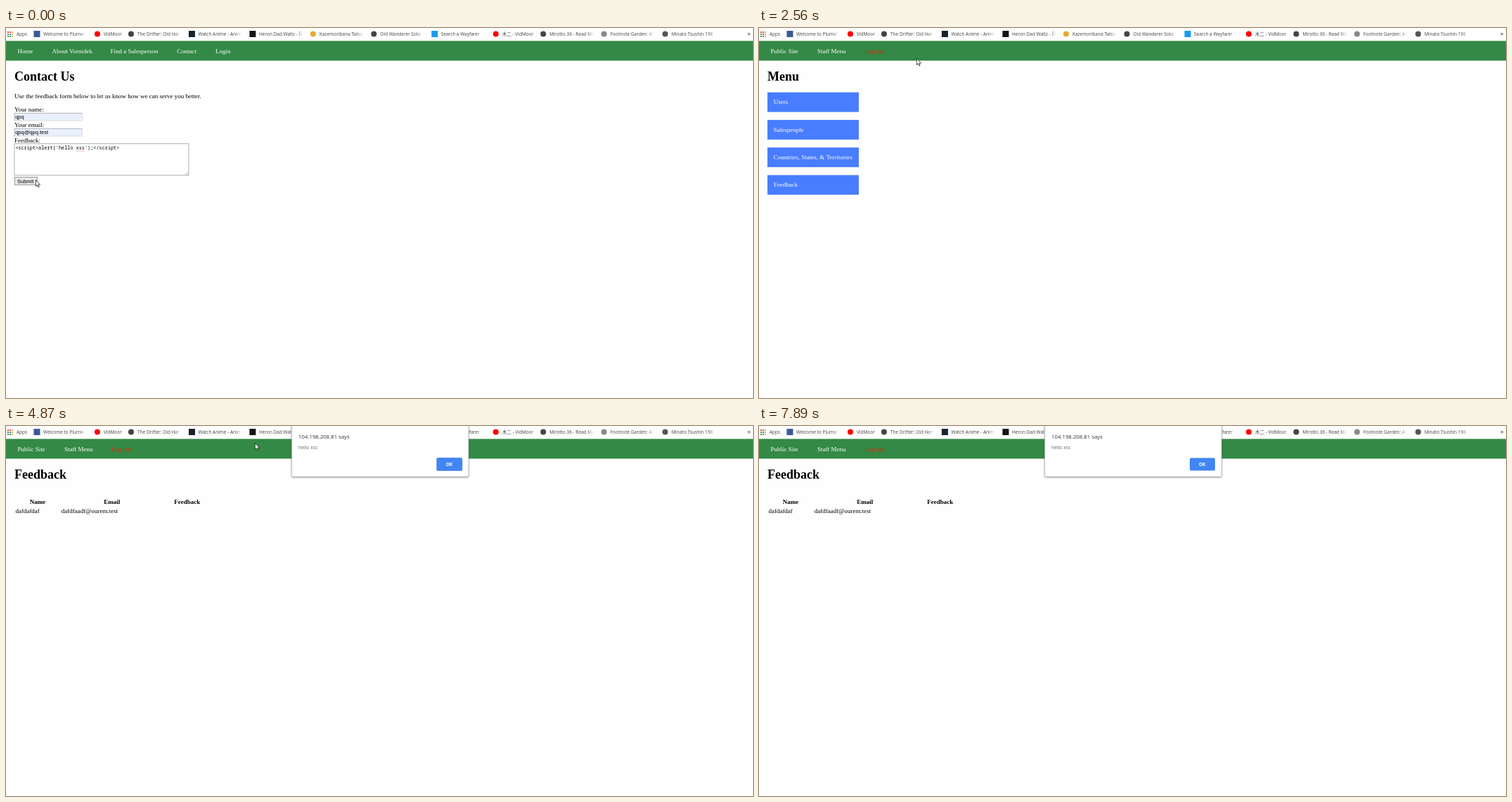
Recreate the animation shown at these times as an HTML page. Size 1063 px wide and 527 px high, loop 7.99 s.

```html
<!DOCTYPE html>
<html lang="en">
<head>
<meta charset="utf-8">
<title>Feedback form</title>
<style>
  html, body { margin: 0; width: 100%; height: 100%; overflow: hidden; background: #fefefe; }
  svg { display: block; }
  text { white-space: pre; }
  .serif { font: 9px "Liberation Serif", "Times New Roman", serif; }
  .bold { font-weight: bold; }
  .title { font: bold 18px "Liberation Serif", "Times New Roman", serif; }
  .ui { font: 6.5px "Open Sans", "Noto Sans CJK SC", "Noto Sans CJK JP", sans-serif; }
  .field { font: 7.5px "Liberation Sans", Arial, sans-serif; }
  .code { font: 6.86px "Noto Sans Mono", "DejaVu Sans Mono", monospace; }
</style>
</head>
<body>
<svg id="stage" width="1063" height="527" viewBox="0 0 1063 527">
  <defs>
    <linearGradient id="fade">
      <stop offset="0" stop-color="#fefefe" stop-opacity="0"/>
      <stop offset="1" stop-color="#fefefe"/>
    </linearGradient>
    <filter id="shadow" x="-5%" y="-10%" width="110%" height="125%">
      <feDropShadow dx="0" dy="1" stdDeviation="1" flood-opacity=".45"/>
    </filter>
  </defs>
  <rect width="1063" height="527" fill="#fefefe"/>
  <g id="bookmarks"></g>
  <rect y="18.4" width="1063" height="28.1" fill="#338945"/>
  <g id="publicNav"></g>
  <g id="staffNav"></g>
  <g id="contact"></g>
  <g id="received"></g>
  <g id="menu"></g>
  <g id="feedback"></g>
  <g id="dialog"></g>
  <path id="arrow" d="M.4 .4V9.5L2.4 7.6L3.8 10.8L5.2 10.2L3.8 7.1H6.6Z" fill="#fff" stroke="#111" stroke-width=".75"/>
  <path id="hand" d="M2.7 1.4Q3.6 .2 4.5 1.4V5.2L7.4 5.8Q8.8 6.2 8.6 7.8L7.8 12.4H3.2L.5 8.4Q.4 7 1.5 7.3L2.7 8.6Z" fill="#fff" stroke="#111" stroke-width=".8"/>
</svg>
<script>
const NS = "http://www.w3.org/2000/svg";
const LOOP = 7990;
const el = id => document.getElementById(id);

function add(parent, tag, attrs, content) {
  const node = document.createElementNS(NS, tag);
  for (const key in attrs) node.setAttribute(key, attrs[key]);
  if (content) node.textContent = content;
  parent.appendChild(node);
  return node;
}
const text = (parent, cls, x, y, content, fill = "#000", anchor = "start") =>
  add(parent, "text", { class: cls, x, y, fill, "text-anchor": anchor }, content);
const rect = (parent, x, y, width, height, fill, more) =>
  add(parent, "rect", { x, y, width, height, fill, ...more });

// Bookmark: label, label x, right edge, icon colour, icon shape
const bookmarks = [
  ["Welcome to Plumvi", 53, 115, "#3b5998", "square"],
  ["VidMoor", 139, 167, "#f00", "circle"],
  ["The Drifter: Old Har", 187, 250, "#444", "circle"],
  ["Watch Anime - Anim", 273.5, 336, "#182430", "square"],
  ["Heron Dad Waltz - 阡", 360, 423, "#151515", "square"],
  ["Kazemoribana Tatsuo -", 446, 509, "#e8ac32", "circle"],
  ["Old Wanderer Sota", 532.5, 594, "#444", "circle"],
  ["Search a Wayfarer", 619, 680, "#1a9af0", "square"],
  ["木二 - VidMoor", 706, 753, "#f00", "circle"],
  ["Mirotto 36 - Read Ma", 773.5, 837, "#444", "circle"],
  ["Footnote Garden: AP", 860, 922, "#888", "circle"],
  ["Minato Tsushin 198", 947, 1010, "#555", "circle"]
];

function drawBookmarks() {
  const bar = el("bookmarks");
  const dots = ["#e24b3b", "#e24b3b", "#e9a53a", "#3d9b57", "#4279d8", "#e9a53a", "#3d9b57", "#3d9b57", "#e9b33a"];
  dots.forEach((fill, i) => rect(bar, 2 + i % 3 * 3, 5 + Math.floor(i / 3) * 3, 2, 2, fill));
  text(bar, "ui", 15, 10.7, "Apps", "#444");
  for (const [label, x, end, fill, shape] of bookmarks) {
    if (shape === "circle") add(bar, "circle", { cx: x - 9, cy: 8.4, r: 4, fill });
    else rect(bar, x - 13.5, 4, 9, 9, fill);
    const box = add(bar, "svg", { x, y: 0, width: end - x, height: 18, overflow: "hidden" });
    text(box, "ui", 0, 10.7, label, "#444");
    if (end - x > 55) rect(box, end - x - 10, 0, 10, 18, "url(#fade)");
  }
  text(bar, "ui", 1055, 10.8, "»", "#333").style.fontSize = "9px";
}

function drawNav() {
  const publicNav = el("publicNav"), staffNav = el("staffNav");
  [[16.5, "Home"], [65.5, "About Vornidek"], [148.5, "Find a Salesperson"], [243.3, "Contact"], [298, "Login"]]
    .forEach(([x, label]) => text(publicNav, "serif", x, 36, label, "#fff"));
  text(staffNav, "serif", 16.5, 36, "Public Site", "#fff");
  text(staffNav, "serif", 83, 36, "Staff Menu", "#fff");
  text(staffNav, "serif", 150, 36, "Log out", "#f51d0c");
}

function drawContact() {
  const page = el("contact");
  text(page, "title", 12, 75, "Contact Us");
  text(page, "serif", 12, 99.6, "Use the feedback form below to let us know how we can serve you better.");
  [["Your name:", "qpq", 118.6], ["Your email:", "qpq@qpq.test", 140.6]].forEach(([label, value, y]) => {
    text(page, "serif", 12, y, label);
    rect(page, 12, y + 2.5, 96.5, 11, "#e8f0fe");
    add(page, "path", { d: `M12 ${y + 13.4}V${y + 2.7}H108.4`, fill: "none", stroke: "#888", "stroke-width": .6 });
    add(page, "path", { d: `M12 ${y + 13.4}H108.4V${y + 2.7}`, fill: "none", stroke: "#ccc", "stroke-width": .6 });
    text(page, "field", 13.2, y + 10.5, value);
  });
  text(page, "serif", 12, 162.6, "Feedback:");
  rect(page, 12, 164.8, 248, 45, "#fff", { stroke: "#999", "stroke-width": .8 });
  text(page, "code", 13.2, 173, "<script>alert('hello xss');<\/script>");
  add(page, "path", { d: "M99.5 175.6" + "l1 -1l1 1".repeat(6), fill: "none", stroke: "#e55", "stroke-width": .5 });
  add(page, "path", { d: "M254.5 209l4.5 -4.5M257 209l2 -2", stroke: "#888", "stroke-width": .5 });
  rect(page, 12.2, 212.4, 32.4, 11, "#e7e7e7", { stroke: "#888", "stroke-width": .8 });
  text(page, "field", 16, 220.6, "Submit");
}

function drawReceived() {
  const page = el("received");
  text(page, "title", 12, 75, "Feedback Received");
  text(page, "serif", 12, 99.6, "Thank you for submitting feedback. We hope to be able to use it to serve you");
  text(page, "serif", 12, 109.6, "better.");
}

let feedbackButton;
function drawMenu() {
  const page = el("menu");
  text(page, "title", 12, 75, "Menu");
  ["Users", "Salespeople", "Countries, States, & Territories", "Feedback"].forEach((label, i) => {
    const y = 91.6 + i * 39.3;
    feedbackButton = rect(page, 12, y, 130, 28, "#497dff");
    text(page, "serif", 20.8, y + 16.7, label, "#fff");
  });
}

function drawFeedback() {
  const page = el("feedback");
  text(page, "title", 12, 75, "Feedback");
  [[45, "Name"], [150.7, "Email"], [257.8, "Feedback"]]
    .forEach(([x, label]) => text(page, "serif bold", x, 111, label, "#000", "middle"));
  text(page, "serif", 13.4, 123.6, "dafdafdaf");
  text(page, "serif", 78.7, 123.6, "dafdfaadf@ourem.test");
}

let okButton;
function drawDialog() {
  const box = el("dialog");
  rect(box, 406.7, -4, 251.5, 76, "#fff", { rx: 1, stroke: "#aaa", "stroke-width": .6, filter: "url(#shadow)" });
  text(box, "ui", 416, 17.8, "104.198.208.81 says", "#333").style.fontSize = "7.8px";
  text(box, "ui", 416, 33.4, "hello xss", "#666").style.fontSize = "6.75px";
  okButton = rect(box, 613, 45.5, 36, 18, "#4285f4", { rx: 1.5, "stroke-width": .7 });
  text(box, "ui bold", 630.7, 56.8, "OK", "#fff", "middle").style.fontWeight = 700;
}

// Pointer stops: time, x, y, shape
const stops = [
  [0, 42, 216], [830, 30, 170], [950, 16, 124], [1100, 85, 60], [1230, 136, 91.5],
  [1380, 80, 112], [1500, 29, 100], [1620, 159, 57], [1770, 210, 46], [1890, 260, 36],
  [2020, 300, 30], [2170, 297, 30, "hand"], [2440, 270, 34], [2560, 224, 43],
  [2680, 130, 70], [2800, 74, 100], [2950, 74, 178], [3100, 73, 207], [3230, 69, 215, "hand"],
  [3940, 71, 209], [4070, 76, 202], [4220, 383, 129], [4370, 430, 70], [4490, 470, 1],
  [4610, 495, 40], [4730, 502, 82], [4870, 354, 24], [5000, 484, 88], [5150, 375, 1],
  [5280, 460, 40], [5430, 563, 75], [5550, 363, 10], [5700, 482, 115], [5830, 532, 60],
  [5980, 401, 142], [6100, 530, 17], [6220, 629, 63], [6380, 628, 115], [6500, 628, 170],
  [6620, 628, 223], [6770, 472, 513], [6930, 0, 0, "none"]
];

function show(id, visible) {
  el(id).style.display = visible ? "" : "none";
}

function render(t) {
  const staff = t >= 2320;
  show("publicNav", !staff);
  show("staffNav", staff);
  show("contact", t < 400);
  show("received", t >= 400 && !staff);
  show("menu", staff && t < 3790);
  show("feedback", t >= 3790);
  show("dialog", t >= 3940);
  feedbackButton.setAttribute("fill", t >= 3230 ? "#3f6fe0" : "#497dff");
  okButton.setAttribute("stroke", t >= 7890 ? "none" : "#3b78e7");

  const [, x, y, shape = "arrow"] = stops.findLast(stop => stop[0] <= t);
  for (const id of ["arrow", "hand"]) {
    show(id, id === shape);
    el(id).setAttribute("transform", `translate(${x} ${y})`);
  }
}

drawBookmarks();
drawNav();
drawContact();
drawReceived();
drawMenu();
drawFeedback();
drawDialog();

const start = performance.now();
function tick() {
  render((performance.now() - start) % LOOP);
  requestAnimationFrame(tick);
}
tick();
</script>
</body>
</html>
```
